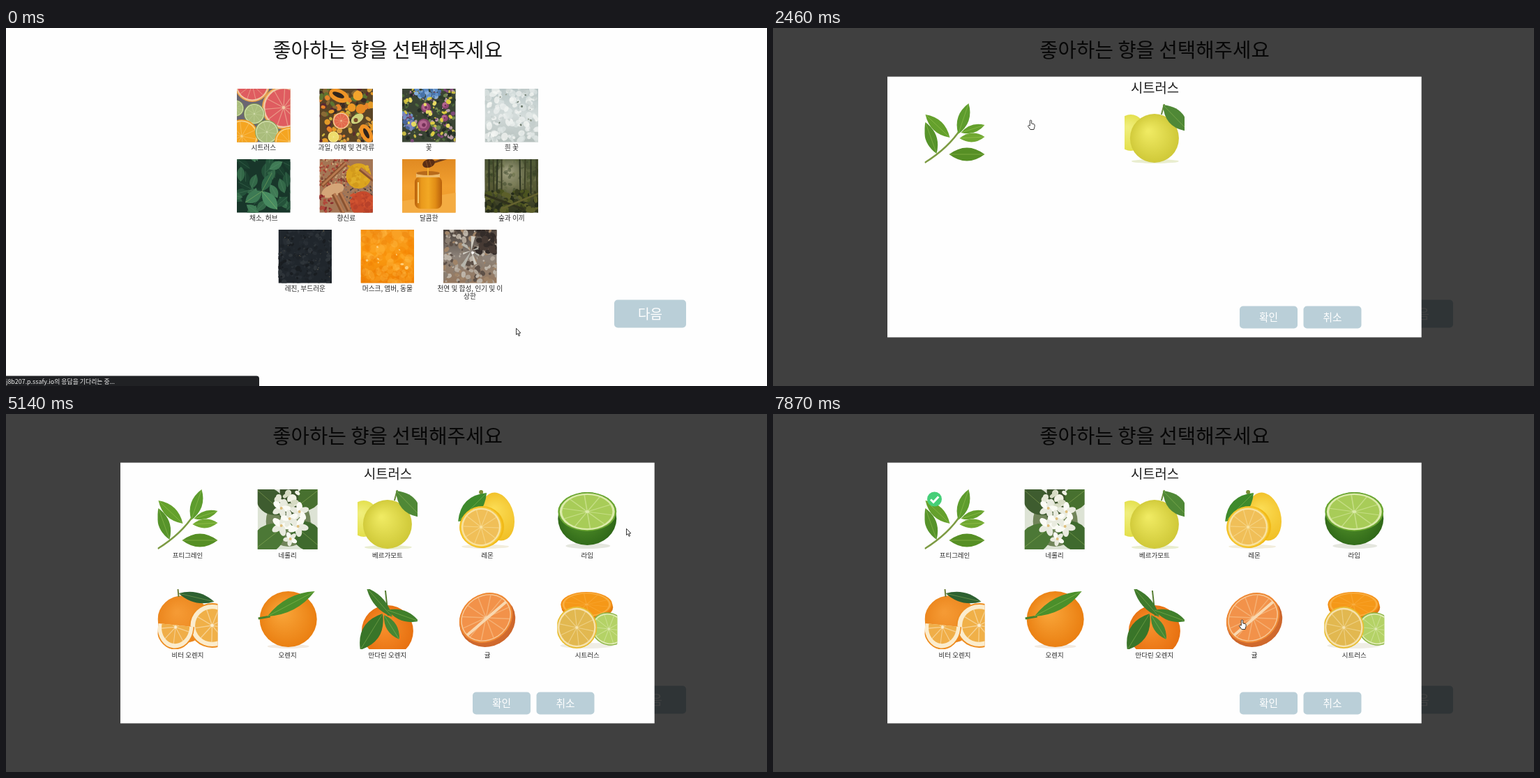
An HTML page with a canvas that plays this animation: 1091 px wide and 513 px high, repeating every 8000 ms.

```html
<!DOCTYPE html>
<html lang="ko">
<head>
<meta charset="utf-8">
<title>향 선택</title>
<style>
html, body { margin: 0; width: 100%; height: 100%; overflow: hidden; background: #fefefe; }
canvas { display: block; }
</style>
</head>
<body>
<canvas id="stage" width="1091" height="513"></canvas>
<script>
const W = 1091, H = 513, LOOP = 8000, TICK = 200 / 3;
const FONT = '"Noto Sans CJK KR", "Noto Sans CJK", sans-serif';
const screen = document.getElementById('stage').getContext('2d');
let c = screen;

// ---------- helpers ----------
function layer(paint) {
  const cv = document.createElement('canvas');
  cv.width = W; cv.height = H;
  const old = c;
  c = cv.getContext('2d');
  paint();
  c = old;
  return cv;
}
function text(s, x, y, size, color = '#2a2a2a', align = 'center', weight = 300) {
  c.font = `${weight} ${size}px ${FONT}`;
  c.fillStyle = color;
  c.textAlign = align;
  c.textBaseline = 'middle';
  c.fillText(s, x, y);
}
function rect(x, y, w, h, color) { c.fillStyle = color; c.fillRect(x, y, w, h); }
function oval(x, y, rx, ry, color, turn = 0) {
  c.fillStyle = color;
  c.beginPath();
  c.ellipse(x, y, rx, ry, turn, 0, 7);
  c.fill();
}
function disc(x, y, r, color) { oval(x, y, r, r, color); }
function poly(pts, color) {
  c.fillStyle = color;
  c.beginPath();
  for (let i = 0; i < pts.length; i += 2) c.lineTo(pts[i], pts[i + 1]);
  c.closePath();
  c.fill();
}
function line(x1, y1, x2, y2, color, w = 1) {
  c.strokeStyle = color;
  c.lineWidth = w;
  c.beginPath();
  c.moveTo(x1, y1);
  c.lineTo(x2, y2);
  c.stroke();
}
function ball(x, y, rx, ry, light, dark, turn = 0) {
  const g = c.createRadialGradient(x - rx * .25, y - ry * .3, 2, x, y, Math.max(rx, ry) * 1.1);
  g.addColorStop(0, light);
  g.addColorStop(1, dark);
  oval(x, y, rx, ry, g, turn);
}
function fade(size, ...colors) {
  const g = c.createLinearGradient(0, 0, 0, size);
  colors.forEach((k, i) => g.addColorStop(i / (colors.length - 1), k));
  rect(0, 0, size, size, g);
}
function leaf(x1, y1, x2, y2, w, color, rib = 'rgba(200,225,120,.45)') {
  const mx = (x1 + x2) / 2, my = (y1 + y2) / 2, d = Math.hypot(x2 - x1, y2 - y1);
  const nx = -(y2 - y1) / d * w * 1.6, ny = (x2 - x1) / d * w * 1.6;
  c.fillStyle = color;
  c.beginPath();
  c.moveTo(x1, y1);
  c.quadraticCurveTo(mx + nx, my + ny, x2, y2);
  c.quadraticCurveTo(mx - nx, my - ny, x1, y1);
  c.fill();
  line(x1, y1, x2, y2, rib, .7);
}
function slice(x, y, rx, ry, rind, pith, flesh, turn = 0, n = 10, inner = .86) {
  c.save();
  c.translate(x, y);
  c.rotate(turn);
  c.scale(1, ry / rx);
  disc(0, 0, rx, rind);
  disc(0, 0, rx * .94, pith);
  disc(0, 0, rx * inner, flesh);
  c.globalAlpha = .55;
  for (let i = 0; i < n; i++) {
    const a = i * 2 * Math.PI / n + .2;
    line(0, 0, Math.cos(a) * rx * inner, Math.sin(a) * rx * inner, pith, rx * .04);
  }
  c.globalAlpha = 1;
  disc(0, 0, rx * .07, pith);
  c.restore();
}
function random(seed) {
  return () => (seed = seed * 16807 % 2147483647) / 2147483647;
}
function scatter(seed, n, [x, y, w, h], r0, r1, colors) {
  const rnd = random(seed);
  for (let i = 0; i < n; i++) {
    const r = r0 + rnd() * (r1 - r0);
    oval(x + rnd() * w, y + rnd() * h, r, r * (.5 + rnd() * .5), colors[i % colors.length], rnd() * 3);
  }
}
function button(s, x, y, w, h, size, color = '#bacfd8') {
  c.fillStyle = color;
  c.beginPath();
  c.roundRect(x, y, w, h, 5);
  c.fill();
  text(s, x + w / 2, y + h / 2, size, '#fff');
}
function picture(paint, x, y, size) {
  c.save();
  c.translate(x, y);
  c.beginPath();
  c.rect(0, 0, size, size);
  c.clip();
  paint();
  c.restore();
}

// ---------- category pictures, 76.5 px ----------
const FULL = [0, 0, 77, 77];
const pink = (x, y, r) => slice(x, y, r, r, '#eda24a', '#f0c8a4', '#df5c60', 0, 11);
const lime = (x, y, r) => slice(x, y, r, r, '#86a052', '#d5dfb0', '#aabd7c', 0, 9);
const orange = (x, y, r) => slice(x, y, r, r, '#ee9a1c', '#f8d080', '#f5a521', 0, 10);

function citrus() {
  rect(0, 0, 77, 77, '#6a6672');
  lime(-2, 28, 12);
  pink(22, -6, 25);
  pink(67, 27, 31);
  lime(25, 36, 15);
  orange(7, 68, 24);
  lime(43, 62, 17);
  orange(75, 76, 21);
}
function fruits() {
  rect(0, 0, 77, 77, '#5a4426');
  scatter(11, 130, FULL, 2, 5, ['#5e7430', '#e39a28', '#5a2a30', '#c9b23c', '#8a6a35', '#e8842a', '#3a2a24', '#d8a040']);
  oval(28, 10, 15, 9, '#ee9427', .4);
  oval(27, 9, 9, 3.5, '#2f241d', .4);
  disc(55, 10, 7, '#f2a42c');
  disc(46, 27, 6, '#ee9a25');
  disc(59, 29, 7, '#e88a22');
  slice(31, 46, 12, 12, '#eca447', '#f3d2a8', '#e36a4c');
  oval(54, 43, 10, 6, '#cfd47c', -.6);
  disc(52, 45, 3, '#7a4e2a');
  oval(67, 64, 14, 8, '#f09225', 1.1);
  oval(67, 64, 8, 3, '#2f241d', 1.1);
  slice(20, 69, 8, 8, '#e8c83c', '#f4eab0', '#eedb68');
}
function flowers() {
  rect(0, 0, 77, 77, '#3a4434');
  scatter(7, 190, FULL, 1, 3.5, ['#4f6b3c', '#c8ba44', '#242c26', '#7d4a78', '#6f8550', '#b89aa4', '#2c3a2a']);
  scatter(5, 45, [20, -3, 36, 18], 2, 4, ['#5f8fc8', '#88aed8', '#4772a8']);
  scatter(9, 24, [0, 34, 18, 24], 2, 4, ['#6c8fc0', '#7f82b8', '#48669a']);
  for (const [x, y, r] of [[34, 27, 7], [31, 52, 9], [61, 42, 5], [62, 24, 5]]) {
    disc(x, y, r, '#8e4570');
    disc(x - 1, y - 1, r * .65, '#b4668f');
    disc(x, y, r * .3, '#743258');
  }
  scatter(23, 20, [4, 12, 66, 60], 2, 4, ['#dccb40', '#e8da62']);
}
function whites() {
  fade(77, '#b9c7c7', '#d3dbda', '#b4bfbc');
  scatter(31, 150, FULL, 2, 6, ['rgba(223,230,228,.7)', 'rgba(240,243,241,.7)', 'rgba(195,206,203,.6)', 'rgba(248,249,247,.7)']);
  scatter(14, 12, FULL, .8, 2, ['#6f7d70', '#96a094']);
}
function herbs() {
  rect(0, 0, 77, 77, '#18362a');
  const rnd = random(46);
  for (let i = 0; i < 34; i++) {
    const x = rnd() * 76, y = rnd() * 76, a = rnd() * 6.3;
    leaf(x, y, x + Math.cos(a) * 22, y + Math.sin(a) * 22, 7,
      ['#24523a', '#336848', '#1a3f2e', '#3f7a55'][i % 4], 'rgba(110,165,130,.35)');
  }
  leaf(36, 46, 58, 72, 11, '#478a60');
  leaf(36, 46, 12, 62, 10, '#3d7a54');
  leaf(36, 46, 50, 20, 8, '#2f6848');
}
function spices() {
  rect(0, 0, 77, 77, '#a47655');
  scatter(18, 170, [0, 0, 42, 40], .8, 2, ['#a13c32', '#c9a67a', '#7b4434', '#bd5a40']);
  scatter(28, 130, [34, 35, 43, 42], .8, 2, ['#5b4a44', '#87706a', '#3f3634', '#a5806a']);
  disc(56, 24, 18, '#dba41f');
  scatter(3, 40, [42, 10, 28, 28], 1, 4, ['#e0ae28', '#d29a1c']);
  disc(62, 64, 18, '#c64a2c');
  scatter(4, 40, [46, 50, 30, 26], 1, 4, ['#d05230', '#b8422a']);
  oval(19, 45, 17, 9, '#d5a678', -.4);
  for (const [x1, y1, x2, y2] of [[3, 38, 37, 6], [20, 50, 34, 78], [29, 48, 42, 74], [58, 14, 78, 30]]) {
    line(x1, y1, x2, y2, '#8a5230', 6);
    line(x1 + 1, y1 - 1, x2 + 1, y2 - 1, '#b87a50', 3);
  }
  scatter(8, 26, [0, 52, 18, 25], 1.5, 3, ['#8a2c2c', '#b0483a']);
}
function honey() {
  fade(77, '#e08a22', '#f2a030', '#ee9a2a');
  poly([0, 77, 0, 60, 77, 48, 77, 77], '#f4ac42');
  const g = c.createLinearGradient(18, 0, 57, 0);
  ['#b8600c', '#ea9a1c', '#f2a824', '#e28e16', '#b8600c'].forEach((k, i) => g.addColorStop(i / 4, k));
  c.fillStyle = g;
  c.beginPath();
  c.roundRect(18, 25, 39, 46, 8);
  c.fill();
  rect(22, 33, 2, 30, '#f8c868');
  rect(20, 19, 34, 7, '#eebb6c');
  oval(37, 20, 17, 3, '#b86a1a');
  line(37, 10, 37, 23, '#f0ae30', 2);
  line(44, 5, 66, -2, '#70401e', 3);
  oval(38, 6, 9, 6, '#5b2e14', -.3);
  line(34, 2, 37, 12, '#8c4c20');
  line(39, 1, 42, 10, '#8c4c20');
}
function forest() {
  fade(77, '#4c5636', '#565934', '#30351e');
  ball(38, 28, 22, 36, 'rgba(172,170,138,.9)', 'rgba(110,114,78,0)');
  scatter(71, 110, [0, 0, 77, 48], 1, 4, ['rgba(45,58,32,.4)', 'rgba(88,98,55,.4)', 'rgba(130,132,90,.3)']);
  for (let i = 0; i < 9; i++) {
    const x = i < 5 ? i * 6 : 50 + (i - 5) * 8;
    line(x, 0, x + (i % 3) - 1, 55, i % 2 ? '#2c3320' : '#3c4026', 2);
  }
  scatter(72, 110, [0, 46, 77, 31], 1.5, 5, ['#4b5320', '#363b1e', '#5c5f2a', '#262c1a']);
  line(0, 51, 56, 72, '#30311c', 3);
  line(24, 71, 77, 49, '#64622f', 2.5);
}
function resin() {
  rect(0, 0, 77, 77, '#20262c');
  scatter(91, 220, FULL, 1, 4, ['#1d2227', '#282e34', '#23292f', '#191d21', '#2e3439']);
  scatter(92, 24, FULL, .4, 1.2, ['#5a5446', '#444640']);
}
function amber() {
  fade(77, '#f59a20', '#fb9a10', '#ee8206');
  scatter(61, 120, FULL, 3, 8, ['rgba(255,176,50,.35)', 'rgba(243,128,0,.35)', 'rgba(255,195,85,.3)', 'rgba(230,116,0,.3)']);
  scatter(63, 8, [8, 20, 60, 45], 1, 3, ['#ffcf7a']);
}
function crystal() {
  fade(77, '#4a413b', '#8c8279', '#96785e');
  scatter(81, 190, FULL, 1, 4.5, ['#8a7d70', '#b0a598', '#5d5047', '#a08468', '#bdb4a8']);
  scatter(83, 40, [48, 0, 29, 32], 2, 6, ['#332c29', '#463a34']);
  for (let i = 0; i < 7; i++) {
    const a = i * .9 + .2, r = 12 + i % 3 * 6;
    poly([40, 30, 40 + Math.cos(a) * r, 33 + Math.sin(a) * r,
      40 + Math.cos(a + .25) * r, 33 + Math.sin(a + .25) * r], i % 2 ? '#cfccc2' : '#b6b5ac');
  }
  disc(42, 33, 2, '#fff');
}

// ---------- scent pictures, 86 px ----------
const GREEN = '#64a02c', DEEP = '#3f7f2b';

function petitgrain() {
  c.strokeStyle = '#7d9b43';
  c.lineWidth = 2.4;
  c.beginPath();
  c.moveTo(0, 85);
  c.quadraticCurveTo(34, 64, 52, 36);
  c.stroke();
  leaf(17, 72, 1, 27, 10, '#56932a');
  leaf(36, 49, 1, 16, 10, GREEN);
  leaf(48, 44, 63, 0, 10, '#5d9c2d');
  leaf(52, 42, 86, 31, 7, GREEN);
  leaf(50, 50, 86, 48, 8, '#70a832');
  leaf(35, 73, 86, 73, 12, '#568f25');
}
function neroli() {
  rect(0, 0, 86, 86, '#dde3d5');
  oval(44, 46, 32, 36, '#71855a');
  leaf(40, 36, -4, -2, 22, '#3e5c2f');
  leaf(50, 30, 96, -6, 20, '#47702f');
  leaf(42, 50, -12, 92, 24, '#4c7836');
  leaf(46, 46, 96, 88, 24, '#3f6a2e');
  rect(32, 0, 26, 40, '#3b522b');
  scatter(53, 20, [28, 4, 30, 24], 4, 6, ['#f2f2e6', '#d6dbc3', '#e4e7d6']);
  for (const [x, y, r] of [[34, 27, 12], [60, 32, 12], [34, 52, 13], [58, 53, 13], [46, 42, 11], [47, 71, 9]]) {
    for (let i = 0; i < 5; i++) {
      const a = i * 1.257 + x;
      oval(x + Math.cos(a) * r * .55, y + Math.sin(a) * r * .55, r * .62, r * .36, i % 2 ? '#fbfbf5' : '#e9ebdf', a);
    }
    disc(x, y, 2, '#dfbf7c');
  }
}
function bergamot() {
  oval(44, 83, 34, 3, '#e9edcf');
  ball(9, 42, 22, 26, '#f0ee7a', '#e2de48');
  ball(43, 50, 35, 35, '#efea62', '#cdc635');
  line(53, 16, 57, 1, '#6b8b3c', 2);
  leaf(55, 2, 92, 40, 14, '#4f8836');
}
function lemon() {
  oval(40, 82, 34, 3, '#f2eddc');
  ball(58, 39, 23, 35, '#fbdc54', '#f0bd22', -.25);
  disc(34, 4, 3, '#7b8f35');
  leaf(1, 46, 42, 5, 15, '#3e8a2c');
  oval(35, 54, 32, 30, '#f2ba17', -.15);
  slice(34, 54, 30, 29, '#f6c93a', '#f9e2a0', '#f0bf58', -.15);
}
function limeHalf() {
  oval(44, 81, 32, 4, '#e4e6de');
  ball(43, 42, 42, 38, '#5c9c2f', '#2b6316');
  slice(43, 32, 42, 28, '#6aa631', '#dcebaa', '#a8cc58');
}
function bitterOrange() {
  ball(37, 43, 37, 34, '#f59a34', '#ea831a');
  line(30, 11, 29, 0, '#6d7c38', 2);
  leaf(30, 6, 81, 18, 9, '#2e6131');
  slice(78, 52, 33, 32, '#ee8d20', '#fbeccd', '#f0b048', 0, 9, .74);
  c.save();
  c.translate(1, 49);
  c.rotate(.1);
  c.beginPath();
  c.rect(0, 0, 52, 40);
  c.clip();
  slice(25, 3, 27, 32, '#ee8d20', '#fbeccd', '#f0ae48', 0, 9, .74);
  c.restore();
}
function sweetOrange() {
  oval(44, 82, 30, 3, '#f1eae1');
  ball(44, 43, 41, 40, '#f9a63a', '#e97c0e');
  line(1, 42, 18, 39, '#49812b', 3);
  leaf(14, 39, 82, 3, 11, '#4b8f2b');
}
function mandarin() {
  ball(43, 60, 37, 37, '#f9922e', '#e66e0e');
  line(40, 2, 44, 38, '#567d32', 2);
  leaf(50, 40, 13, -2, 9, '#3f7a2c');
  leaf(43, 30, 88, 46, 9, DEEP);
  leaf(36, 35, 4, 87, 16, '#397529');
  leaf(38, 37, 60, 72, 9, '#468632');
}
function tangerine() {
  ball(43, 45, 41, 37, '#f0883a', '#c8622a', -.5);
  slice(41, 41, 40, 34, '#ee8834', '#f8c896', '#f2924a', -.6, 12, .9);
  line(14, 66, 70, 18, '#f9d8b0', 4);
}
function citrusMix() {
  oval(42, 81, 38, 4, '#efede5');
  oval(43, 26, 37, 18, '#e07c14');
  slice(42, 22, 37, 18, '#f38e13', '#f9ae40', '#f59818');
  slice(74, 57, 26, 23, '#8ab444', '#e0ebb4', '#b4d266', .5);
  slice(28, 55, 29, 30, '#e8bd33', '#f6e2ae', '#e2b850');
}

// ---------- layout ----------
const CATS = [
  [citrus, 331, 87, '시트러스'], [fruits, 449.5, 87, '과일, 야채 및 견과류'],
  [flowers, 568, 87, '꽃'], [whites, 686.5, 87, '흰 꽃'],
  [herbs, 331, 188, '채소, 허브'], [spices, 449.5, 188, '향신료'],
  [honey, 568, 188, '달콤한'], [forest, 686.5, 188, '숲과 이끼'],
  [resin, 390.5, 289, '레진, 부드러운'], [amber, 508.5, 289, '머스크, 앰버, 동물'],
  [crystal, 627, 289, '천연 및 합성, 인기 및 이']
];
const SCENTS = [
  [petitgrain, '프티그레인'], [neroli, '네롤리'], [bergamot, '베르가모트'], [lemon, '레몬'], [limeHalf, '라임'],
  [bitterOrange, '비터 오렌지'], [sweetOrange, '오렌지'], [mandarin, '만다린 오렌지'], [tangerine, '귤'], [citrusMix, '시트러스']
].map(([paint, name], i) => [paint, 217.5 + i % 5 * 143.2, i < 5 ? 108 : 251, name]);

const page = layer(() => {
  rect(0, 0, W, H, '#fefefe');
  text('좋아하는 향을 선택해주세요', 547, 31, 28.7, '#1a1a1a');
  for (const [paint, x, y, name] of CATS) {
    picture(paint, x, y, 76.5);
    text(name, x + 38.3, y + 84, 9.7);
  }
  text('상한', 665, 384, 9.7);
  button('다음', 872, 389.5, 103, 40, 19);
});
function modal(full) {
  return layer(() => {
    c.drawImage(page, 0, 0);
    rect(0, 0, W, H, 'rgba(0,0,0,.75)');
    rect(164, 69.7, 765.7, 373.6, '#fefefe');
    text('시트러스', 547.5, 86, 18.8, '#1a1a1a');
    SCENTS.forEach(([paint, x, y, name], i) => {
      if (full || i === 0 || i === 2) picture(paint, x, y, 86);
      if (full) text(name, x + 43, y + 94, 9.5);
    });
    button('확인', 669, 398.5, 83, 32, 14.7);
    button('취소', 760.5, 398.5, 83, 32, 14.7);
  });
}
const partModal = modal(false), fullModal = modal(true);

// ---------- pointer: tick, x, y ----------
const PATH = [
  [10, 731, 430], [17, 520, 200], [21, 385, 71], [23, 377, 112], [25, 361, 131], [27, 361, 131],
  [30, 369, 132], [37, 369, 132], [40, 377, 135], [43, 377, 135], [47, 394, 143], [52, 396, 210],
  [55, 396, 210], [59, 520, 293], [61, 551, 279], [62, 551, 279], [70, 689, 181], [72, 689, 181],
  [77, 889, 164], [79, 889, 164], [92, 170, 270], [97, 245, 211], [101, 270, 177], [103, 270, 177],
  [111, 690, 408], [113, 695, 412], [116, 673, 315], [118, 672, 295]
];
function pointer(n) {
  const i = PATH.findIndex(k => k[0] > n);
  if (i === 0) return PATH[0].slice(1);
  if (i < 0) return PATH[PATH.length - 1].slice(1);
  const [n0, x0, y0] = PATH[i - 1], [n1, x1, y1] = PATH[i];
  const f = (n - n0) / (n1 - n0);
  return [Math.round(x0 + (x1 - x0) * f), Math.round(y0 + (y1 - y0) * f)];
}
const ARROW = new Path2D('M0 0V9.2L2.1 7.4 3.6 11 5.1 10.4 3.6 6.9 6.4 6.7Z');
const HAND = new Path2D('M-1.2 7.8V.4Q0-1 1.2.4V4.6L4.8 5.4Q6 6 5.6 9L4.4 13.2H-.6L-4 8.4Q-3.6 6.2-1.2 7.8Z');
function drawPointer(x, y, hand) {
  const shape = hand ? HAND : ARROW;
  c.save();
  c.translate(x + .5, y + .3);
  c.fillStyle = '#fff';
  c.strokeStyle = '#222';
  c.lineWidth = .9;
  c.fill(shape);
  c.stroke(shape);
  c.restore();
}
const inside = (x, y, bx, by, w, h) => x >= bx && x < bx + w && y >= by && y < by + h;

function statusBar(alpha) {
  c.globalAlpha = alpha;
  c.fillStyle = '#202124';
  c.beginPath();
  c.roundRect(0, 498.5, 363, 20, [0, 4, 0, 0]);
  c.fill();
  text('j8b207.p.ssafy.io의 응답을 기다리는 중...', 0, 506.5, 8.9, '#eee', 'left', 400);
  c.globalAlpha = 1;
}
function checkMark() {
  disc(231.5, 122, 10.5, '#46cf78');
  c.strokeStyle = '#fff';
  c.lineWidth = 3;
  c.beginPath();
  c.moveTo(226, 122.5);
  c.lineTo(230, 126.3);
  c.lineTo(237.3, 118.5);
  c.stroke();
}

function draw(now) {
  const n = Math.floor((now % LOOP + 10) / TICK);
  const open = n >= 37, [x, y] = pointer(n);
  c.drawImage(!open ? page : n < 38 ? partModal : fullModal, 0, 0);
  if (n < 6) statusBar(n < 4 ? 1 : (6 - n) / 3);
  if (n >= 101) checkMark();
  const onOk = open && inside(x, y, 669, 398, 83, 33);
  if (onOk) button('확인', 669, 398.5, 83, 32, 14.7, '#adc5cf');
  if (n === 35 || n === 36) disc(x, y, 8.5, 'rgba(245,232,20,.65)');
  const size = open ? 86 : 76.5;
  const onItem = (open ? SCENTS : CATS).some(s => inside(x, y, s[1], s[2], size, size));
  drawPointer(x, y, onItem || onOk);
  requestAnimationFrame(draw);
}
requestAnimationFrame(draw);
</script>
</body>
</html>
```
